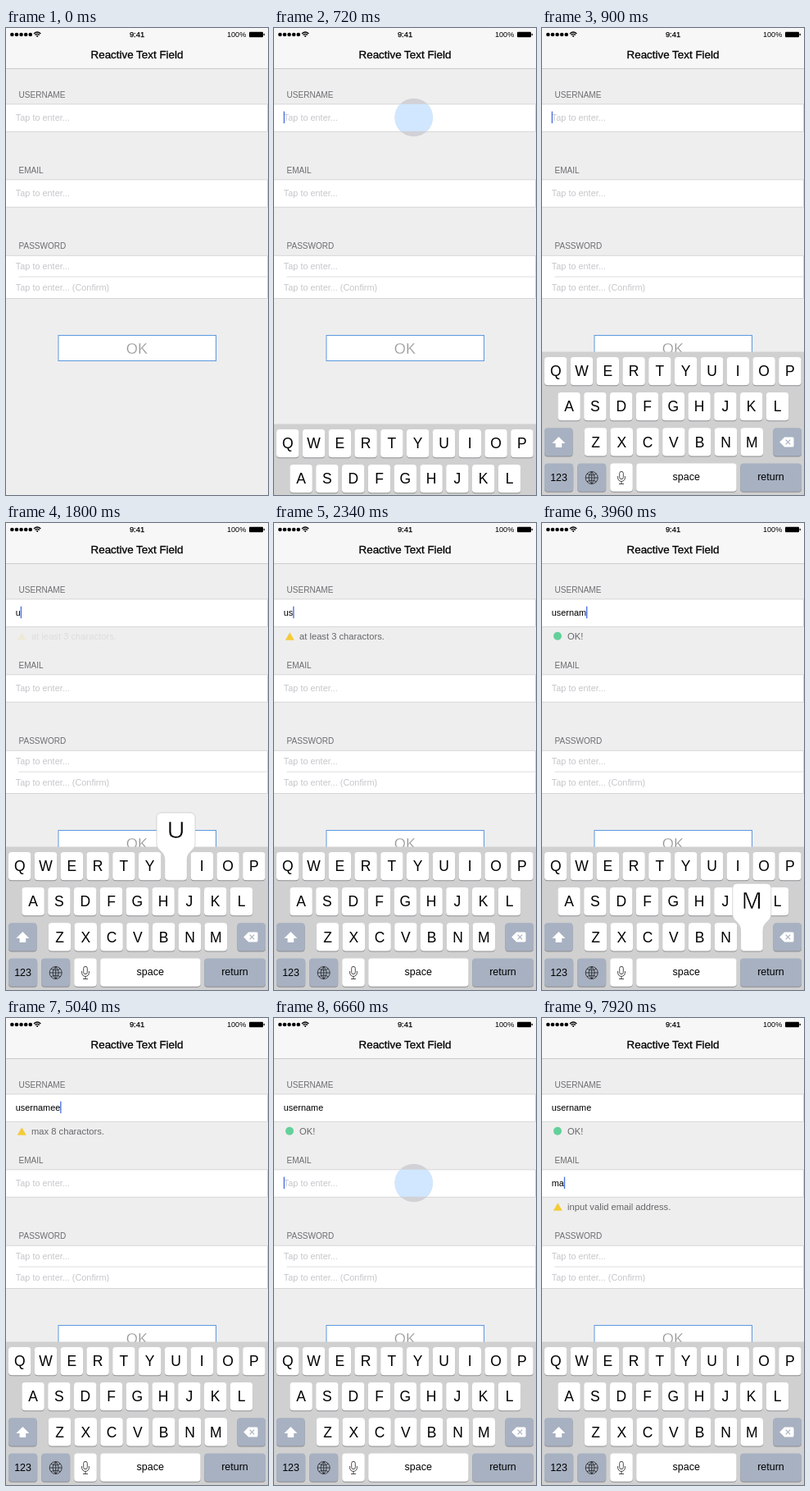
An HTML page that plays this animation: 320x569 px, repeating every 8 s.

```html
<!DOCTYPE html>
<html lang="en">
<head>
<meta charset="utf-8">
<title>Text field validation</title>
<style>
html, body { margin: 0; width: 100%; height: 100%; overflow: hidden; background: #eee; }
svg { display: block; width: 320px; height: 569px; font-family: "Liberation Sans", Arial, sans-serif; }
.mid { text-anchor: middle; }
.label { font-size: 10.05px; fill: #6d6d72; }
.empty { font-size: 10.9px; fill: #c7c7cc; }
.value { font-size: 10.9px; fill: #000; }
.hint { font-size: 11.2px; fill: #66666a; }
.key { font-size: 17.5px; }
.word { font-size: 12.5px; }
.line { fill: none; stroke: #222; stroke-width: .8; }
</style>
</head>
<body>
<svg id="stage" viewBox="0 0 320 569"></svg>
<script>
const NS = 'http://www.w3.org/2000/svg';
const stage = document.getElementById('stage');
const STEP = 180, LOOP = 8000;

function add(parent, tag, attrs = {}, content = '') {
  const el = document.createElementNS(NS, tag);
  for (const name in attrs) el.setAttribute(name, attrs[name]);
  el.textContent = content;
  return parent.appendChild(el);
}
const rect = (p, x, y, width, height, fill, more) => add(p, 'rect', { x, y, width, height, fill, ...more });
const text = (p, x, y, content, cls, more) => add(p, 'text', { x, y, class: cls, ...more }, content);
const path = (p, d, more) => add(p, 'path', { d, ...more });
const circle = (p, cx, cy, r, fill, more) => add(p, 'circle', { cx, cy, r, fill, ...more });
const show = (el, on) => el.setAttribute('opacity', +on);

// Status and title bars
rect(stage, 0, 0, 320, 569, '#eee');
rect(stage, 0, 0, 320, 49, '#f7f7f7');
rect(stage, 0, 49, 320, 1, '#cbcbcb');
for (let i = 0; i < 5; i++) circle(stage, 7.4 + i * 5.6, 8, 2.3, '#000');
path(stage, 'M34 7 Q38.2 3 42.4 7 M35.5 8.6 Q38.2 6.2 40.9 8.6', { fill: 'none', stroke: '#000', 'stroke-width': 1.3 });
path(stage, 'M36.7 9.6 Q38.2 8.5 39.7 9.6 L38.2 11.2 Z');
text(stage, 160, 11.2, '9:41', 'mid', { 'font-size': 9.4, stroke: '#000', 'stroke-width': .25 });
text(stage, 270, 11.2, '100%', '', { 'font-size': 9.1 });
rect(stage, 297, 4.7, 17, 6.6, '#000', { rx: 1 });
rect(stage, 314.6, 6.7, 1.2, 2.6, '#000', { rx: .5 });
text(stage, 160, 37.2, 'Reactive Text Field', 'mid', { 'font-size': 13.4, stroke: '#000', 'stroke-width': .3 });

// Form
function box(y, height) {
  rect(stage, 0, y, 319.5, height, '#fff');
  path(stage, `M0 ${y} H319.5 V${y + height} H0`, { fill: 'none', stroke: '#d6d6d8', 'stroke-width': 1 });
}
function makeField(y, name) {
  text(stage, 15.5, y - 8, name, 'label');
  box(y, 33.5);
  return {
    y,
    empty: text(stage, 11.8, y + 20.3, 'Tap to enter...', 'empty'),
    value: text(stage, 11.8, y + 20.3, '', 'value'),
    hint: makeHint(y + 45.5)
  };
}
function makeHint(y) {
  const group = add(stage, 'g');
  return {
    group,
    ok: circle(group, 19, y - .5, 5, '#63d09a'),
    warn: path(group, `M19.3 ${y - 5} L24.8 ${y + 4.5} H13.8 Z`, { fill: '#f4cb38' }),
    label: text(group, 31, y + 3.6, '', 'hint')
  };
}
const user = makeField(92.8, 'USERNAME');
const mail = makeField(184.8, 'EMAIL');
text(stage, 15.5, 269.2, 'PASSWORD', 'label');
box(277.3, 52.2);
rect(stage, 15.5, 302.6, 304, 1, '#dedee0');
text(stage, 11.8, 293.6, 'Tap to enter...', 'empty');
text(stage, 11.8, 319.8, 'Tap to enter... (Confirm)', 'empty');
rect(stage, 64, 374.5, 192.5, 31, '#fff', { stroke: '#5c98e0', 'stroke-width': 1 });
text(stage, 160, 396.8, 'OK', 'mid', { 'font-size': 18.2, fill: '#989898', stroke: '#fff', 'stroke-width': .35 });

const caret = rect(stage, 0, 0, 1.3, 14.5, '#456be0');

// Touch marker, tinted blue where it lies over the white box
const touch = add(stage, 'g');
circle(touch, 170.7, 0, 23.2, '#d1d1d6');
const clip = add(add(stage, 'defs'), 'clipPath', { id: 'band' });
rect(clip, 140, -16.2, 60, 33);
circle(touch, 170.7, 0, 23.2, '#d0e7ff', { 'clip-path': 'url(#band)' });

// Keyboard
const board = add(stage, 'g');
rect(board, 0, 394.5, 320, 174.5, '#d0d0d1');
const WHITE = '#fff', DARK = '#a7b1c1';
function cap(x, y, width, fill) {
  rect(board, x, y + 1, width, 34.3, '#8d8e91', { rx: 4 });
  return rect(board, x, y, width, 34.3, fill, { rx: 4 });
}
const keys = {};
[['QWERTYUIOP', 3, 401], ['ASDFGHJKL', 19.4, 444], ['ZXCVBNM', 51.8, 487.2]].forEach(([letters, x0, y]) => {
  [...letters].forEach((letter, i) => {
    const x = x0 + i * 31.8;
    cap(x, y, 27.4, WHITE);
    text(board, x + 13.7, y + 23.4, letter, 'mid key');
    keys[letter] = { x: x + 13.7, y };
  });
});
cap(3, 487.2, 34.6, DARK);
path(board, 'M20.4 498 L28.4 506 H24.2 V511 H16.6 V506 H12.4 Z', { fill: '#fff' });
const eraser = cap(282.4, 487.2, 34.6, DARK);
const eraserIcon = path(board, 'M290.2 504.5 L296.2 498.5 H306 Q307.5 498.5 307.5 500 V509 Q307.5 510.5 306 510.5 H296.2 Z', { fill: '#fff' });
const cross = path(board, 'M297.6 501.7 L303.2 507.3 M303.2 501.7 L297.6 507.3', { 'stroke-width': 1.2 });

cap(3, 530.5, 35.2, DARK);
text(board, 20.6, 552, '123', 'mid word');
cap(43.2, 530.5, 35, DARK);
path(board, 'M53.2 548 A7.5 7.5 0 1 1 68.2 548 A7.5 7.5 0 1 1 53.2 548 H68.2 M60.7 540.5 V555.5 M60.7 540.5 Q53.4 548 60.7 555.5 Q68 548 60.7 540.5 M55 543.2 Q60.7 546.6 66.4 543.2 M55 552.8 Q60.7 549.4 66.4 552.8', { class: 'line' });
cap(83.2, 530.5, 27.6, WHITE);
rect(board, 94.7, 540.3, 4.6, 9.4, 'none', { rx: 2.3, class: 'line' });
path(board, 'M92.6 546 V548 A4.4 4.4 0 0 0 101.4 548 V546 M97 552.4 V555.5 M94 555.5 H100', { class: 'line' });
cap(115.2, 530.5, 122.4, WHITE);
text(board, 176.3, 551.2, 'space', 'mid word');
cap(242.2, 530.5, 74.8, DARK);
text(board, 279.5, 551.2, 'return', 'mid word');

// Enlarged letter above a pressed key
const popup = add(stage, 'g');
path(popup, 'M-17.5 -48 H17.5 Q23.5 -48 23.5 -42 V-10 C23.5 -2 13.7 -1 13.7 9 V30.3 Q13.7 34.3 9.7 34.3 H-9.7 Q-13.7 34.3 -13.7 30.3 V9 C-13.7 -1 -23.5 -2 -23.5 -10 V-42 Q-23.5 -48 -17.5 -48 Z',
  { fill: '#fff', stroke: '#bcbcbe', 'stroke-width': .6 });
const bigLetter = text(popup, 0, -17, '', 'mid', { 'font-size': 30, stroke: '#fff', 'stroke-width': .6 });

// Story: time, field, value, pressed key ('' marks a tap on the field)
const events = [[720, user, '', '']];
[...'usernamee'].forEach((c, i, all) =>
  events.push([1800 + i * 360, user, all.slice(0, i + 1).join(''), c.toUpperCase()]));
events.push([5760, user, 'username', '<'], [6660, mail, '', ''], [7200, mail, 'm', 'M'], [7560, mail, 'ma', 'A']);

function userHint(value) {
  if (!value) return '';
  if (value.length < 3) return 'at least 3 charactors.';
  return value.length > 8 ? 'max 8 charactors.' : 'OK!';
}
const mailHint = value => value ? 'input valid email address.' : '';

function drawField(field, time, rule) {
  let value = '', message = '', since = 0;
  for (const [at, target, typed] of events) {
    if (at > time || target !== field) continue;
    value = typed;
    if (rule(value) !== message) { message = rule(value); since = at; }
  }
  const age = time - since, { hint } = field;
  field.value.textContent = value;
  show(field.empty, !value);
  hint.label.textContent = message;
  show(hint.ok, message === 'OK!');
  show(hint.warn, message !== 'OK!');
  show(hint.group, !message ? 0 : age < STEP ? .12 : age < 2 * STEP ? .8 : 1);
}

function drawCaret(field, age) {
  const phase = age % 1080;
  caret.setAttribute('x', 11.7 + field.value.getComputedTextLength());
  caret.setAttribute('y', field.y + 8.8);
  show(caret, phase < 540 ? 1 : phase < 720 ? .5 : 0);
}

function draw(ms) {
  const time = Math.floor(ms % LOOP / STEP) * STEP;
  drawField(user, time, userHint);
  drawField(mail, time, mailHint);

  const last = events.filter(e => e[0] <= time).pop();
  const [at, field, , key] = last || [0, user, '', null];
  const age = time - at, pressed = last && age < STEP;
  if (last) drawCaret(field, age); else show(caret, 0);

  show(touch, pressed && key === '' ? 1 : 0);
  touch.setAttribute('transform', `translate(0 ${field.y + 16.2})`);
  board.setAttribute('transform', `translate(0 ${time < 720 ? 176 : time < 900 ? 88 : 0})`);

  const erasing = pressed && key === '<';
  eraser.setAttribute('fill', erasing ? WHITE : DARK);
  eraserIcon.setAttribute('fill', erasing ? '#222' : '#fff');
  cross.setAttribute('stroke', erasing ? '#fff' : DARK);

  const spot = pressed && keys[key];
  show(popup, !!spot);
  if (spot) {
    popup.setAttribute('transform', `translate(${spot.x} ${spot.y})`);
    bigLetter.textContent = key;
  }
}

const start = performance.now();
function tick() {
  draw(performance.now() - start);
  requestAnimationFrame(tick);
}
tick();
</script>
</body>
</html>
```
